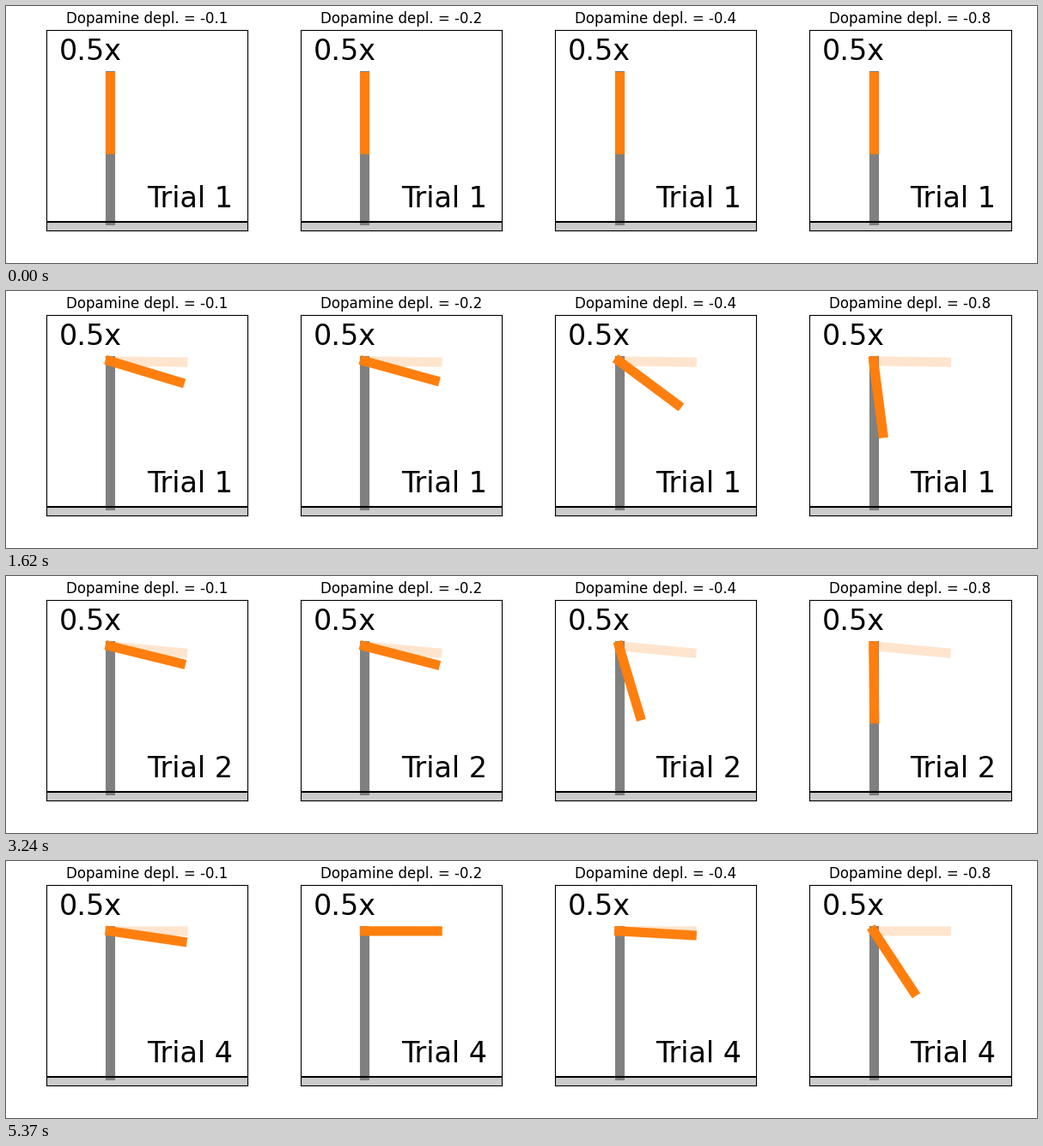
Animation, 1200 px wide and 300 px high, one loop 5.4 s. Source, as a matplotlib script:

```python
import numpy as np
import matplotlib.pyplot as plt
from matplotlib.animation import FuncAnimation

DPI, W, H = 100, 1200, 300
STEP_MS, TRIAL_STEPS = 30, 60
TRIAL_MS = STEP_MS * TRIAL_STEPS
DEPLETION = (-0.1, -0.2, -0.4, -0.8)

LEFT, PITCH, SIDE = 46.8, 296.2, 234.2
TOP, BOTTOM, GROUND = 28.1, 262.1, 252.1
PIVOT_X, PIVOT_Y, ARM = 74.35, 81.8, 84.8
POST_TOP, POST_FOOT = 81.4, 250.2
ORANGE = "#ff7f0e"

# Share of the goal angle each panel's arm keeps up with, by trial number.
READINESS = {1: (.68, .52, .19, .007),
             2: (.862, .816, .062, .001),
             4: (.745, .911, .473, .042)}
# Exponent the share ends on: 0 catches up fully, 1 not at all.
FINAL_POWER = (.33, 0, .05, .313)
TRIALS = list(READINESS)


def minimum_jerk(s):
    return s**3 * (10 - 15 * s + 6 * s**2)


def arm_share(trial, panel, s):
    """Constant share at first, then a late catch-up."""
    late = np.clip((s - .55) / .43, 0, 1)**1.5
    return READINESS[trial][panel]**(1 + (FINAL_POWER[panel] - 1) * late)


def point_arm(line, angle):
    line.set_data([PIVOT_X, PIVOT_X + ARM * np.sin(angle)],
                  [PIVOT_Y, PIVOT_Y + ARM * np.cos(angle)])


def make_panel(index):
    ax = fig.add_axes([(LEFT + PITCH * index) / W, 1 - BOTTOM / H,
                       SIDE / W, (BOTTOM - TOP) / H])
    ax.set(xlim=(0, SIDE), ylim=(BOTTOM, TOP), xticks=[], yticks=[])
    ax.set_title(f"Dopamine depl. = {DEPLETION[index]}", fontsize=12)
    ax.axhspan(GROUND, BOTTOM, color="0.8", lw=0)
    ax.plot([PIVOT_X, PIVOT_X], [POST_TOP, POST_FOOT], color="gray", lw=8)
    ax.axhline(GROUND, color="black", lw=1.5)
    ghost, = ax.plot([], [], color=ORANGE, lw=8, alpha=0.2)
    arm, = ax.plot([], [], color=ORANGE, lw=8)
    ax.text(14.7, 63.4, "0.5x", fontsize=24)
    label = ax.text(SIDE / 2, 235.3, "", fontsize=24)
    return ghost, arm, label


plt.rcParams["font.family"] = "DejaVu Sans"
fig = plt.figure(figsize=(W / DPI, H / DPI), dpi=DPI, facecolor="white")
panels = [make_panel(i) for i in range(len(DEPLETION))]


def update(frame):
    index, step = divmod(frame, TRIAL_STEPS)
    trial = TRIALS[index]
    s = max(0, step * STEP_MS - 5) / TRIAL_MS
    goal = np.pi / 2 * minimum_jerk(s)
    for i, (ghost, arm, label) in enumerate(panels):
        point_arm(ghost, goal)
        point_arm(arm, goal * arm_share(trial, i, s))
        label.set_text(f"Trial {trial}")
    return [artist for panel in panels for artist in panel]


anim = FuncAnimation(fig, update, frames=TRIAL_STEPS * len(TRIALS),
                     interval=STEP_MS, repeat=True, repeat_delay=0)
plt.show()
```
